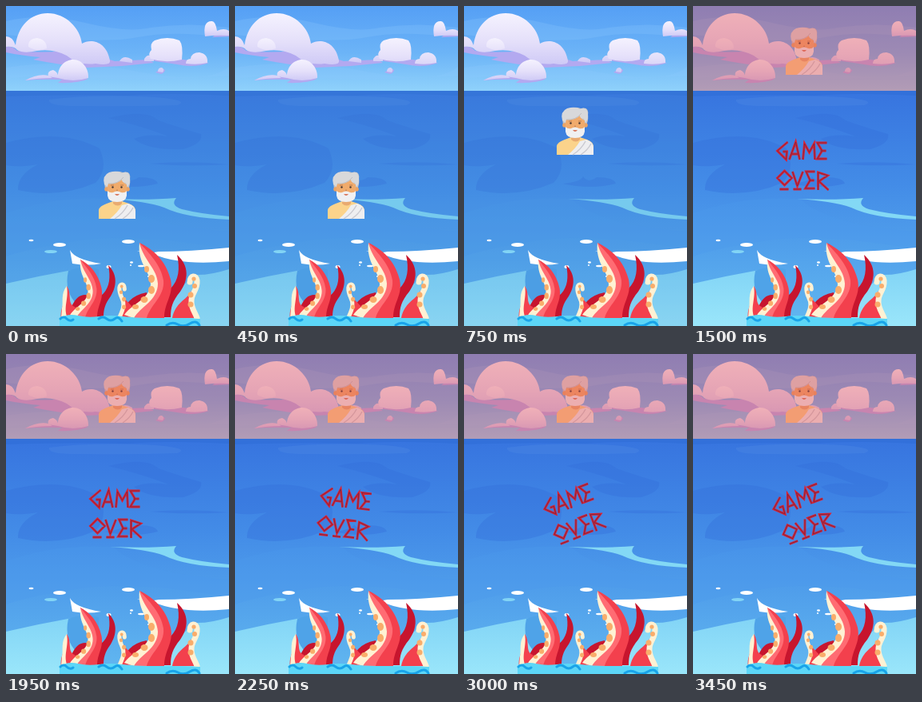
Recreate the animation shown at these times as an HTML page. Size 279 by 400 pixels, loop 3750 ms.

```html
<!DOCTYPE html>
<html lang="en">
<head>
<meta charset="utf-8">
<title>Game over</title>
<style>
html, body { margin: 0; width: 100%; height: 100%; overflow: hidden; }
svg { display: block; width: 100%; height: 100%; }
</style>
</head>
<body>
<svg viewBox="0 0 279 400" preserveAspectRatio="none">
<defs>
  <linearGradient id="sky" x2="0" y2="1"><stop stop-color="#559ff5"/><stop offset=".55" stop-color="#6cb4f7"/><stop offset="1" stop-color="#90d2fb"/></linearGradient>
  <linearGradient id="sea" x2="0" y2="1"><stop stop-color="#3774df"/><stop offset=".4" stop-color="#438ce7"/><stop offset="1" stop-color="#62b8f0"/></linearGradient>
  <linearGradient id="shallow" x2="0" y2="1"><stop stop-color="#82d4f6"/><stop offset="1" stop-color="#9ae6fa"/></linearGradient>
  <linearGradient id="puff" x2="0" y2="1"><stop stop-color="#f5f2fe"/><stop offset=".55" stop-color="#e5e0fa"/><stop offset="1" stop-color="#cfcaf6"/></linearGradient>

  <g id="arm">
    <path fill="#f3404d" d="M0 0C17 8 33 22 39 46C43 66 31 74 31 94H-15C-7 80 19 72 18 52C17 34-1 26 0 0Z"/>
    <path fill="#ff6c73" d="M0 0C11 12 27 27 30 47C32 67 13 78 9 94H-15C-7 80 19 72 18 52C17 34-1 26 0 0Z"/>
    <path fill="#fff1d3" d="M0 0C-3 26 14 36 14 52C13 70-9 76-19 90L-7 94C1 80 23 72 23 51C22 32 5 22 0 0Z"/>
    <g fill="#f9ad6b">
      <ellipse cx="9" cy="33" rx="3" ry="4"/><ellipse cx="15" cy="45" rx="4" ry="5"/><ellipse cx="15" cy="59" rx="4" ry="5"/>
      <ellipse cx="6" cy="71" rx="4.5" ry="4"/><ellipse cx="-5" cy="80" rx="4" ry="3"/>
    </g>
  </g>
  <path id="fin" fill="#c7152e" d="M0 0C16 14 14 32 4 46C-6 58-8 66-8 78H-30C-28 60-18 50-8 42C2 32 4 18 0 0Z"/>
  <g id="hook">
    <path fill="#f3404d" d="M-4 22C-10 34-24 36-28 56H2C-6 44-4 36 1 26Z"/>
    <path fill="none" stroke="#fff1d3" stroke-width="7" stroke-linecap="round" d="M-6 11C-6 2 2 2 3 9C4 22-5 25-4 36C-4 44 0 48 3 56"/>
    <g fill="#f9ad6b"><circle cx="-1" cy="7" r="2.6"/><circle cx="0" cy="16" r="3"/><circle cx="-5" cy="27" r="3.5"/><circle cx="-5" cy="39" r="3.5"/></g>
  </g>
</defs>

<g id="sky-layer">
  <path fill="url(#sky)" d="M0 0H279V107H0Z"/>
  <path fill="#8bc8fb" opacity=".25" d="M0 19Q45 8 99 21T181 27Q230 20 279 27V40Q210 30 165 39T0 36ZM0 77Q78 65 165 82T279 76V87Q178 94 96 90T0 92Z"/>
  <g fill="#b3a9f0">
    <path d="M0 51Q9 50 14 56Q42 59 72 56Q112 61 136 69L178 67L185 71L145 75L101 77Q64 73 34 67L43 64Q20 62 0 58Z"/>
    <path d="M24 93Q42 84 58 88Q80 86 103 91Q91 97 65 96L70 92Q43 91 24 93ZM178 66Q200 63 222 67L254 71Q235 78 214 73L187 69ZM264 35L279 33V38L258 39ZM187 83Q196 77 199 80Q198 84 194 85Z"/>
  </g>
  <g fill="url(#puff)">
    <path d="M0 38Q8 38 12 49C15 25 31 9 52 9C75 9 93 28 95 47C106 40 126 44 130 68Q132 75 112 72Q91 75 76 62Q59 53 39 56Q22 60 14 55Q10 50 0 51Z"/>
    <path d="M28 51Q27 41 39 40Q51 42 51 53Q39 58 28 51ZM142 69Q147 60 158 67V71ZM173 66Q178 58 185 65V69H173Z"/>
    <path d="M65 90C64 76 74 67 84 67C96 67 104 79 103 90Q84 96 65 90ZM53 88Q51 81 59 80Q66 83 65 90ZM24 93Q40 84 53 87L58 90Q40 90 24 93Z"/>
    <path d="M181 66Q177 59 182 55Q180 46 186 43Q202 37 217 43Q222 49 220 67Q199 72 181 66ZM225 72Q225 66 231 66Q232 58 242 58Q253 60 252 71Q239 74 225 72ZM190 82Q190 77 195 77Q199 79 196 83Z"/>
    <path d="M249 38Q246 19 257 19Q262 18 264 31Q273 27 279 31V37Q263 36 249 38Z"/>
  </g>
</g>

<g id="sea-layer">
  <path fill="url(#sea)" d="M0 106H279V400H0Z"/>
  <path fill="#3270da" d="M0 106H279V112Q200 108 151 112Q83 110 0 113Z"/>
  <path fill="#4884e4" opacity=".5" d="M54 117Q108 110 187 114Q232 118 214 124Q157 126 96 125Q51 126 54 117Z"/>
  <g fill="#346fdb" opacity=".38">
    <path d="M128 140Q176 128 191 143Q213 151 244 160Q247 172 222 179Q178 181 160 166Q177 159 203 163Q170 150 128 140Z"/>
    <path d="M0 171Q69 152 117 178Q129 204 112 221Q66 241 15 230Q14 211 40 198Q16 202 0 199ZM123 222Q146 220 149 213Q155 222 166 214Q188 214 190 222Q159 230 123 222ZM180 197Q230 193 279 198Q224 201 180 197Z"/>
  </g>
  <path fill="#4b98eb" opacity=".35" d="M0 259Q60 237 134 241Q169 274 279 282V304Q160 283 94 293T0 313Z"/>
  <path fill="url(#shallow)" d="M0 347Q43 337 88 329L112 400H0ZM236 336Q254 337 279 329V400H184Q198 367 220 351Z"/>
  <path fill="#4fa3e8" d="M78 331Q98 323 116 329V374H90Q72 358 78 331Z"/>
  <path fill="#83d8f5" d="M130 241Q178 243 213 240Q205 249 220 254Q244 260 279 263V267Q225 265 198 252Q176 244 130 241Z"/>
  <path id="shade" fill="#4188cd" opacity=".19" d="M0 106H279V400H0Z"/>
</g>

<g fill="#fff">
  <path d="M80 305Q86 317 119 322Q103 325 83 322ZM164 306Q177 310 191 307Q230 307 279 302V319Q250 322 228 320Q205 318 189 312L195 320Q181 313 164 306Z"/>
  <ellipse cx="67" cy="298.5" rx="8" ry="2.5"/><ellipse cx="153" cy="294.5" rx="8" ry="2.5"/>
  <ellipse cx="31.5" cy="293" rx="3" ry="1.3"/><ellipse cx="128.5" cy="326" rx="3" ry="2"/>
  <ellipse cx="157" cy="320.5" rx="2" ry="1.2"/><ellipse cx="169" cy="325" rx="4" ry="1.3"/>
  <circle cx="156" cy="324" r="1"/><circle cx="178" cy="338" r="1"/>
  <ellipse cx="56" cy="307" rx="8" ry="2" fill="#82d4f5"/>
</g>

<g id="kraken">
  <use href="#fin" transform="translate(214 311)"/>
  <use href="#fin" transform="translate(128 324) scale(.75 .84)"/>
  <path fill="#c7152e" d="M82 376Q90 357 105 362L110 390H78ZM148 390Q146 364 176 358L184 390Z"/>
  <path fill="#f3404d" d="M76 350C83 359 76 372 86 376L92 390H69C67 376 77 367 76 350Z"/>
  <path fill="#fff1d3" d="M76 350C68 360 72 370 70 378L69 390H77C71 377 79 366 76 350Z"/>
  <use href="#arm" transform="translate(93 317) scale(.68 .77)"/>
  <use href="#hook" transform="translate(144 345) scale(-.72 .8)"/>
  <use href="#arm" transform="translate(167 296)"/>
  <use href="#hook" transform="translate(236 334)"/>
  <path fill="#5cd6f7" d="M67 390Q78 384 90 387T116 388T146 388T176 390T204 390T243 391V400H67Z"/>
  <path fill="none" stroke="#19a4e9" stroke-width="3" stroke-linecap="round" d="M68 391Q72 387 76 391T84 392M116 391Q121 387 126 391T136 391T145 394M201 399Q208 394 215 398T230 397T242 399"/>
</g>

<g id="man">
  <path fill="#fbd38b" d="M0 60V49Q1 44 10 41L18 38H29L38 41Q46 44 46 50V60Z"/>
  <path fill="#e9aa70" d="M18 34H29V41Q24 46 18 41Z"/>
  <path fill="#eeeef0" d="M14 60Q23 53 29 43L37 41Q46 44 46 51V60Z"/>
  <path fill="none" stroke="#c9c9d0" stroke-width="1.4" d="M20 60Q31 53 36 43M30 60Q39 54 43 46"/>
  <path fill="#c5c5c8" d="M8 22Q5 7 14 3Q22-1 30 2Q41-1 39 11Q40 16 37 23H8Z"/>
  <g fill="#eaa466"><circle cx="10" cy="23" r="2.8"/><circle cx="36" cy="23" r="2.8"/></g>
  <path fill="#f0ab6c" d="M11 15Q20 16 29 11Q31 16 35 17V28Q33 38 23 38Q13 38 11 28Z"/>
  <path fill="#f0f0f1" d="M11 25Q14 28 18 27Q23 24 28 27Q33 28 35 25V31Q34 39 23 39Q12 39 11 31Z"/>
  <path fill="#d8d8da" d="M7 17Q4 6 13 2Q23-1 29 3Q38-1 39 9Q40 15 36 20L34 15Q29 15 29 11Q23 17 12 16L11 20Z"/>
  <path fill="none" stroke="#bebec3" d="M12 16Q24 17 31 8"/>
  <g fill="#483a35"><circle cx="17.5" cy="20.5" r="1.2"/><circle cx="28.5" cy="20.5" r="1.2"/></g>
  <path fill="none" stroke="#b57850" stroke-width=".9" d="M15 18H19M27 18H31M22 24Q23 25 24 24"/>
  <path fill="#d7775c" d="M20 29H26Q23 33 20 29Z"/>
</g>

<path id="glow" fill="#e64b4e" opacity=".4" d="M0 0H279V106H0Z"/>
<g id="title" role="img" aria-label="GAME OVER" fill="none">
  <path id="runes" stroke="#e51c2b" stroke-width="2.8" d="M-19-30L-32-19L-21-8L-20-18H-25M-17-8L-9-30L-4-8M-14-15H-6M0-8L2-28L8-17L14-28L15-8M30-29H18L24-19L18-9H30M22-19H29M-23 6L-14 15L-23 24L-32 15ZM-29 29H-18M-13 7L-7 25L0 7M-12 29H-2M15 7H4L9 18L3 28H15M8 18H14M19 30V8L31 12L20 19L32 30"/>
  <path id="core" stroke="#613052" stroke-width=".8"/>
</g>
</svg>

<script>
const $ = id => document.getElementById(id);
const HOLD = 750;
const manY = [206, 126, 26, 26, 26];
const tilt = [0, 0, 0, 7, -21];

$("core").setAttribute("d", $("runes").getAttribute("d"));

function show(id, on) {
  $(id).setAttribute("visibility", on ? "visible" : "hidden");
}

function draw() {
  const step = Math.floor(performance.now() / HOLD) % 5;
  const over = step > 1;
  $("man").setAttribute("transform", `translate(116 ${manY[step]})`);
  $("title").setAttribute("transform", `translate(137.5 200) rotate(${tilt[step]})`);
  show("glow", over);
  show("title", over);
  show("shade", !over);
  requestAnimationFrame(draw);
}
draw();
</script>
</body>
</html>
```
